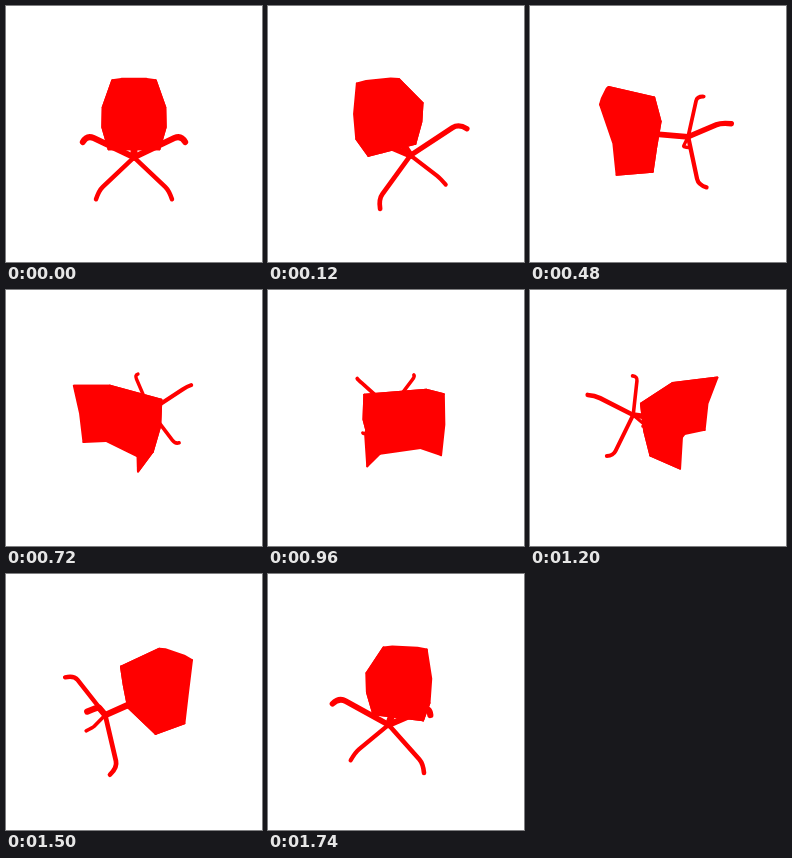
These frames come from a looping animation (256x256 px, 1800 ms). An HTML page:

```html
<!DOCTYPE html>
<html lang="en">
<head>
<meta charset="utf-8">
<title>Turning chair</title>
<style>
  html, body { margin: 0; width: 100%; height: 100%; overflow: hidden; background: #fff; }
  svg { display: block; width: 100vw; height: 100vh; }
  path { stroke: #f00; stroke-linejoin: round; stroke-linecap: round; }
</style>
</head>
<body>
<svg id="stage" viewBox="0 0 256 256"></svg>
<script>
const STEP_MS = 60, STEPS = 30;
const CENTER = 128, CAMERA = 180;
const SIN_PITCH = 0.5, COS_PITCH = Math.sqrt(3) / 2;

// Points are [side, depth, height] around the turning axis.
const hub = [0, -31.2, -5.2];
const shoulder = [29, 1, 28];
const waist = [32, 5, 5];
const low = [28, 8, -24];
const front = [20, 22, -24];
const wingLow = [33, 40, -20];
const wingMid = [32, 39, 12];
const crown = [24, 46, 42];
const crownInner = [14, 46, 43.5];

const mirror = ([side, depth, height]) => [-side, depth, height];
const across = points => [...points, ...points.map(mirror).reverse()];
const bothSides = points => [points, points.map(mirror)];

const faces = [
  across([shoulder, waist, low]),
  across([shoulder, crown, crownInner]),
  across([low, front]),
  ...bothSides([shoulder, crown, wingMid, wingLow, low, waist]),
  ...bothSides([low, front, wingLow])
];
const legs = [
  ...bothSides([hub, [33, -47, 26.5], [34, -55, 25.6]]),
  ...bothSides([hub, [33, -36, -40.5], [34.5, -44, -43]])
];

const stage = document.getElementById("stage");
function addPath(fill, width) {
  const path = document.createElementNS("http://www.w3.org/2000/svg", "path");
  path.setAttribute("fill", fill);
  path.setAttribute("stroke-width", width);
  return stage.appendChild(path);
}
const facePaths = faces.map(() => addPath("#f00", 2));
const legPaths = legs.map(() => addPath("none", 4.5));
const column = addPath("none", 6.5);

function project([side, depth, height], angle) {
  const sin = Math.sin(angle), cos = Math.cos(angle);
  const x = side * cos - depth * sin;
  const near = -depth * cos - side * sin;
  const scale = CAMERA / (CAMERA - near * COS_PITCH - height * SIN_PITCH);
  return {
    x: CENTER + scale * x,
    y: CENTER + scale * (near * SIN_PITCH - height * COS_PITCH),
    scale
  };
}

const xy = p => `${p.x.toFixed(2)} ${p.y.toFixed(2)}`;
const mix = (a, b, k) => a.map((v, i) => v + (b[i] - v) * k);

function draw(angle) {
  const at = point => project(point, angle);
  faces.forEach((face, i) =>
    facePaths[i].setAttribute("d", `M${face.map(p => xy(at(p))).join("L")}Z`));
  legs.forEach(([start, elbow, tip], i) => {
    const bend = mix(start, elbow, 0.88);
    legPaths[i].setAttribute("d", `M${xy(at(start))}L${xy(at(bend))}Q${xy(at(elbow))} ${xy(at(tip))}`);
    legPaths[i].setAttribute("stroke-width", 4.2 * at(elbow).scale);
  });
  column.setAttribute("d", `M${xy(at(hub))}L${xy(at([0, 2, 0]))}`);
  column.setAttribute("stroke-width", 6 * at(hub).scale);
}

const startTime = performance.now();
function tick() {
  const step = Math.floor((performance.now() - startTime) / STEP_MS) % STEPS;
  draw(step / STEPS * 2 * Math.PI);
  requestAnimationFrame(tick);
}
tick();
</script>
</body>
</html>
```
